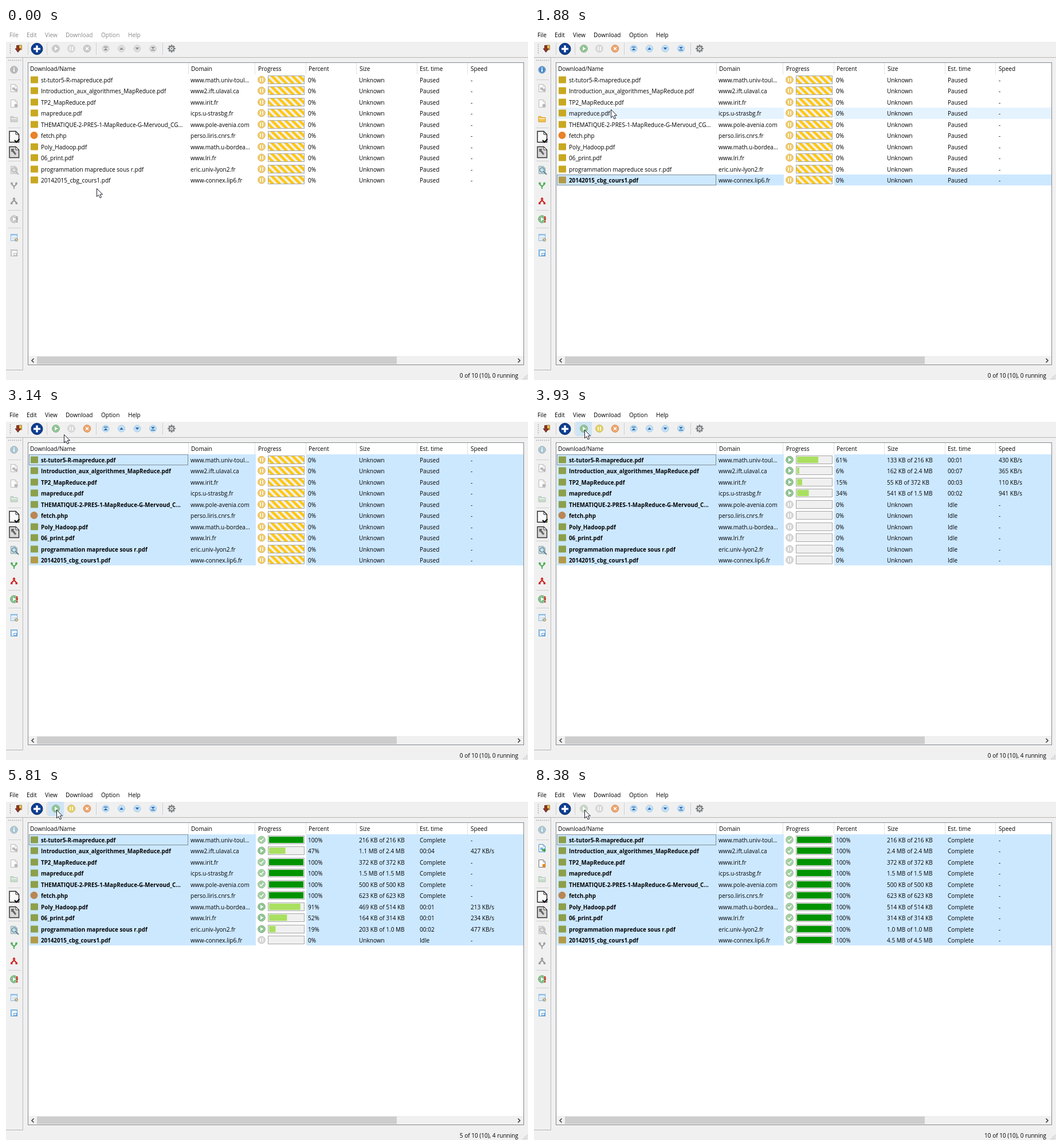
Write an HTML page that moves like this. It is 911 px wide and 615 px high and loops after 9.38 s.

```html
<!DOCTYPE html>
<html lang="en">
<head>
<meta charset="utf-8">
<title>Download list</title>
<style>
html, body { margin: 0; width: 100%; height: 100%; overflow: hidden; background: #f0f0f0; }
svg { display: block; }
text { font: 10.05px "Open Sans", "Noto Sans", sans-serif; white-space: pre; }
text.b { font-weight: 700; font-size: 9.8px; }
</style>
</head>
<body>
<svg id="stage" width="911" height="615" viewBox="0 0 911 615">
  <g id="base"></g>
  <g id="live"></g>
</svg>
<script>
const LOOP = 9380, SELECT = 1400, SELECT_ALL = 2550, START = 3500, ALL_DONE = 8380;
const GREY = '#b9b9b9', ROW_H = 19.45, TOP = 80.9;

// Bursts of repaints: first time, last time, number of steps
const bursts = [[0, 0, 1], [1000, 1000, 1], [1170, 1880, 10], [1960, 2030, 2], [2130, 3140, 11],
  [3220, 4070, 10], [4450, 4680, 3], [5000, 5950, 7], [6120, 7140, 9], [7370, 8010, 5], [8380, 8380, 1]];
const steps = bursts.flatMap(([a, b, n]) =>
  Array.from({ length: n }, (_, i) => n > 1 ? a + (b - a) * i / (n - 1) : a));

const pointer = [[0, 158, 280], [1000, 143, 273], [1170, 138, 268], [1400, 136, 264], [1560, 136, 262],
  [1880, 134, 142], [2030, 131, 110], [2130, 130, 100], [2400, 124, 87], [2700, 122, 86],
  [3140, 101, 46], [3220, 97, 43], [3409, 88, 38]];

// name, host, [time, KB] keys, speed at start and end
const rows = [
  ['st-tutor5-R-mapreduce.pdf', 'www.math.univ-toul...', [[3590, 0], [4060, 216]], 380, 460],
  ['Introduction_aux_algorithmes_MapReduce.pdf', 'www2.ift.ulaval.ca',
    [[3590, 0], [4680, 607], [7140, 1910], [8010, 2430], [8380, 2509]], 355.5, 511.3],
  ['TP2_MapReduce.pdf', 'www.irit.fr', [[3590, 0], [4680, 209], [5300, 372]], 100, 161],
  ['mapreduce.pdf', 'icps.u-strasbg.fr', [[3590, 0], [4440, 1580]], 900, 1020],
  ['THEMATIQUE-2-PRES-1-MapReduce-G-Mervoud_CG...', 'www.pole-avenia.com', [[4060, 0], [4600, 500]], 500, 700],
  ['fetch.php', 'perso.liris.cnrs.fr', [[4440, 0], [4680, 32], [5600, 623]], 90, 167],
  ['Poly_Hadoop.pdf', 'www.math.u-bordea...', [[4600, 0], [4680, 8], [5900, 514]], 20, 230],
  ['06_print.pdf', 'www.lri.fr', [[5300, 0], [6240, 314]], 150, 310],
  ['programmation mapreduce sous r.pdf', 'eric.univ-lyon2.fr', [[5600, 0], [6600, 1060]], 400, 800],
  ['20142015_cbg_cours1.pdf', 'www-connex.lip6.fr', [[5900, 0], [7100, 4650]], 900, 1010]
].map(([name, host, keys, v0, v1]) =>
  ({ name, host, keys, v0, v1, from: keys[0][0], to: keys.at(-1)[0], size: keys.at(-1)[1] }));

const lerp = (a, b, k) => a + (b - a) * k;
function along(keys, t, col = 1) {
  const i = keys.findIndex(k => k[0] > t);
  if (i < 0) return keys.at(-1)[col];
  if (!i) return keys[0][col];
  const a = keys[i - 1], b = keys[i];
  return lerp(a[col], b[col], (t - a[0]) / (b[0] - a[0]));
}

const rect = (x, y, w, h, fill, more = '') => `<rect x="${x}" y="${y}" width="${w}" height="${h}" fill="${fill}" ${more}/>`;
const box = (x, y, w, h, fill, line, more = '') => rect(x + .5, y + .5, w - 1, h - 1, fill, `stroke="${line}" ${more}`);
const path = (d, fill, more = '') => `<path d="${d}" fill="${fill}" ${more}/>`;
const stroke = (d, color, w = 1, more = '') => path(d, 'none', `stroke="${color}" stroke-width="${w}" ${more}`);
const disc = (r, fill, more = '') => `<circle r="${r}" fill="${fill}" ${more}/>`;
const text = (x, y, s, more = '') => `<text x="${x}" y="${y}" ${more}>${s}</text>`;
const at = (x, y, s) => `<g transform="translate(${x} ${y})">${s}</g>`;

const PLAY = path('M-2-3.6L3.6 0-2 3.6z', '#fff');
const PAUSE = rect(-2.7, -3.2, 1.7, 6.4, '#fff') + rect(1, -3.2, 1.7, 6.4, '#fff');
const CROSS = stroke('M-2.4-2.4L2.4 2.4M2.4-2.4L-2.4 2.4', '#fff', 1.8);
const CHECK = stroke('M-3 0L-.7 2.5 3.2-2.2', '#fff', 1.8);
const button = (mark, color, edge, r = 6.3) =>
  disc(r, color, `stroke="${edge}" stroke-width="1"`) + disc(r - 1.2, 'none', 'stroke="#fff" stroke-opacity=".45" stroke-width=".8"') + mark;

const sheet = (line, fill = '#fafafa') => path('M-5.5-6.5h7.5l3.5 3.5v9.5h-11z', fill, `stroke="${line}"`) +
  stroke('M2-6.5v3.5h3.5', line, .8);
const gear = (r, c) => stroke(`M0-${r}V${r}M-${r} 0H${r}M-${r * .7}-${r * .7}L${r * .7} ${r * .7}M${r * .7}-${r * .7}L-${r * .7} ${r * .7}`, c, r * .4) +
  disc(r * .72, c) + disc(r * .42, '#f0f0f0') + disc(r * .18, c);

function arrowIcon(kind, on) {
  const flip = kind > 1 ? -1 : 1, bar = kind % 3 === 0;
  const ink = on ? '#2f6fb5' : '#8f8f8f';
  return disc(6, on ? '#c5e0f5' : '#dedede', `stroke="${on ? '#a3cbe9' : '#cdcdcd'}"`) +
    `<g transform="scale(1 ${flip})">` + path(bar ? 'M0-1L3.4 3h-6.8z' : 'M0-2.2L3.4 2h-6.8z', ink) +
    (bar ? rect(-3.4, -3.4, 6.8, 1.5, ink) : '') + '</g>';
}

function staticPart() {
  let s = rect(0, 0, 911, 615, '#f0f0f0') + rect(0, 0, 911, 24, '#fff');
  s += stroke('M0 51.5H911', '#b4b4b4') + stroke('M29.5 52V597.5H0', '#b4b4b4') + stroke('M30.5 52V597', '#fafafa');
  s += stroke('M7.5 28V46', '#a0a0a0', 1.5, 'stroke-dasharray="1.5 2"') + stroke('M4 56.5H27', '#a0a0a0', 1.5, 'stroke-dasharray="1.5 2"');
  for (const x of [38, 71, 157, 273]) s += stroke(`M${x}.5 26V47`, '#cfcfcf');
  for (const y of [90, 174, 232, 318, 349]) s += stroke(`M4 ${y}.5H26`, '#cfcfcf');
  // Top bar: import, add, settings
  s += at(22, 36, path('M0-6h5.5V2H0z', '#f2c14e', 'stroke="#8d6a2a" stroke-width=".8"') +
    path('M-3.5-5.5h4V0h3.5L-1.2 6.5-6 0h2.5z', '#8f3524', 'stroke="#54231a" stroke-width=".8"'));
  s += at(54, 36.5, disc(10, '#0b3d91', 'stroke="#082c6c"') + path('M-1.7-6h3.4v4.3H6v3.4H1.7V6h-3.4V1.7H-6v-3.4h4.3z', '#fff'));
  s += at(289, 36, gear(6.8, '#7b7f82'));
  // Side bar: always enabled tools
  s += at(14, 190, path('M-8-9.5H3L8.5-4V9.5H-8z', '#fafafa', 'stroke="#222" stroke-width="1.4"') + stroke('M3-9.5V-4h5.5', '#222') +
    stroke('M1 6l3 3.5L9.5 4', '#000', 2));
  s += at(14, 217, path('M-8-9.5H3L8.5-4V9.5H-8z', '#d8d8d8', 'stroke="#333" stroke-width="1.4"') + path('M3-9.5V-4h5.5z', '#fff', 'stroke="#333"') +
    path('M-5-6H1L-1-4 4 3 2 5-3.5-1.5-5 0z', '#666'));
  s += at(14, 366, box(-6, -6, 12, 12, '#fff', '#74aedd') + rect(-5, -5, 10, 2, '#a9d0ee') + stroke('M-4-.5H4M-4 2.5H2', '#9cc5e6') + at(4, 4, gear(3.2, '#a99a6c')));
  // Table
  s += box(38, 60, 866, 529, '#fff', '#828790');
  for (const x of [319, 435, 524, 612, 718, 806]) s += stroke(`M${x - .5} 61V81`, '#e0e0e0');
  [[42, 'Download/Name'], [323, 'Domain'], [440, 'Progress'], [528, 'Percent'], [617, 'Size'], [722, 'Est. time'], [811, 'Speed']]
    .forEach(([x, label]) => s += text(x, 74.5, label));
  s += rect(39, 573, 864, 15, '#f0f0f0') + rect(54, 574, 628, 13, '#cdcdcd');
  s += stroke('M48.5 577.5L45 581l3.5 3.5M893.5 577.5L897 581l-3.5 3.5', '#404040', 1.6);
  for (let i = 0; i < 3; i++) for (let j = 0; j <= i; j++) s += rect(908 - 3 * j, 606 + 3 * i, 1.7, 1.7, '#bcbcbc');
  return s;
}

function tools(t, running, hot) {
  const on = t >= SELECT, many = t >= SELECT_ALL, done = t >= ALL_DONE;
  const canPlay = on && t < 5900, act = on && !done;
  const tone = (ok, c) => ok ? c : GREY;
  let s = '';
  [[6, 'File'], [36, 'Edit'], [68, 'View'], [104, 'Download'], [166, 'Option'], [213, 'Help']]
    .forEach(([x, label]) => s += text(x, 16, label, `fill="${on ? '#000' : '#8a8a8a'}"`));
  if (hot && canPlay) s += rect(73, 24, 28, 25, '#cfe4f4');
  s += at(87, 36, canPlay ? button(PLAY, '#84be87', '#6ba571') : on ? button(PLAY, '#c0d0c0', '#b3c4b3') : button(PLAY, '#c4c4c4', '#b6b6b6'));
  s += at(114, 36, running ? button(PAUSE, '#e2cd4e', '#c4ad3c') : button(PAUSE, '#d5d5d5', '#c8c8c8'));
  s += at(141.5, 36, on ? button(CROSS, '#eb9a5b', '#d5803f') : button(CROSS, '#c4c4c4', '#b6b6b6'));
  [174, 201.5, 229, 256.5].forEach((x, i) => s += at(x, 36, arrowIcon(i, on)));

  const info = !on ? GREY : many ? '#a9c7d3' : '#4b8fd0';
  s += at(14, 73, disc(6.3, info, 'stroke="#a9b4bc"') + rect(-1, -1.2, 2, 4.6, '#fff') + rect(-1, -4, 2, 1.8, '#fff'));
  s += at(14, 105, sheet(tone(done, '#4c8fc9')) + rect(-3, -1, 5, 4, tone(done, '#76b5e8')) + path('M0 2h3V0l4 3.5L3 7V5H0z', tone(done, '#3da044')));
  s += at(14, 132, sheet(tone(done, '#777')) + at(3.5, 3.5, disc(3, tone(done, '#e68a2e'))));
  const folder = !on ? '#cfcfcf' : many ? '#c5dccb' : '#f3c44f';
  s += at(14, 159, path('M-6-4.5h4.5l1.5 2h6v7.5H-6z', folder, `stroke="${on && !many ? '#d19a2c' : '#bcc4bc'}"`) + stroke('M-5-.5H5', '#fff', 1));
  s += at(14, 248, sheet(tone(act, '#8aa3af'), act ? '#cfe0e6' : '#e6e6e6') + disc(3.8, act ? '#bfe0ea' : '#ddd', `stroke="${act ? '#61818d' : '#aaa'}" stroke-width="1.3"`) +
    stroke('M3 3L8 8', tone(act, '#61818d'), 2));
  const fork = act ? '#4fae59' : '#a0a0a0', merge = act ? '#cf2222' : '#999';
  s += at(14, 275, stroke('M0 6V2L-4-2V-3M0 2L4-2V-3', fork, 2) + at(-4, -3.5, disc(2, fork)) + at(4, -3.5, disc(2, fork)));
  s += at(14, 302, stroke('M-4 5V3L0-1 4 3V5M0-1V-4', merge, 2.2) + path('M0-6.5L3-2.5h-6z', merge) +
    rect(-6, 3, 3.4, 3, merge) + rect(2.6, 3, 3.4, 3, merge));
  const alert = on ? '#d6302a' : '#a8a8a8';
  s += at(14, 334, button(PLAY, on ? '#79b77d' : '#c4c4c4', on ? '#5e9f66' : '#b6b6b6') + rect(4, -5, 2.4, 7, alert) + rect(4, 3.5, 2.4, 2.4, alert));
  const pane = tone(on, '#5f9fd6'), tint = on ? '#b5d6ef' : '#dadada';
  s += at(14, 393, box(-6, -6, 12, 12, '#fff', pane) + rect(-5, -5, 10, 2, tint) + rect(-5, -3, 2, 8, tint) + box(-1, 0, 6, 5, '#e8f2fa', pane));
  return s;
}

const amount = kb => kb < 1024 ? Math.floor(kb + 1e-6) + ' KB' : (Math.floor(kb / 102.4) / 10).toFixed(1) + ' MB';

function cells(row, t) {
  const kb = along(row.keys, t), part = kb / row.size;
  if (t >= row.to) return { state: 'done', part: 1, texts: ['100%', `${amount(row.size)} of ${amount(row.size)}`, 'Complete', '-'] };
  if (t >= row.from && kb > 0) {
    const speed = Math.round(lerp(row.v0, row.v1, (t - row.from) / (row.to - row.from)));
    const left = String(Math.ceil((row.size - kb) / speed)).padStart(2, '0');
    return { state: 'run', part, texts: [Math.floor(part * 100 + 1e-6) + '%', `${amount(kb)} of ${amount(row.size)}`, '00:' + left, speed + ' KB/s'] };
  }
  const state = t < START ? 'paused' : 'idle';
  return { state, part: 0, texts: ['0%', 'Unknown', t < START ? 'Paused' : 'Idle', '-'] };
}

const badges = {
  paused: button(PAUSE, '#eec65c', '#d9ad45'), idle: button(PAUSE, '#d2d2d2', '#bdbdbd'),
  run: button(PLAY, '#86bd88', '#6ba571'), done: button(CHECK, '#9ccb9c', '#82b286')
};

function bar(y, { state, part }) {
  let s = box(457, y - 8, 64, 15, '#f0f0f0', '#a6a6a6');
  if (state === 'paused') {
    let d = '';
    for (let x = -9; x < 64; x += 12) d += `M${x} 0h6.5l13 13h-6.5z`;
    s += `<svg x="458" y="${y - 7}" width="62" height="13">${path(d, '#ffc814')}</svg>`;
  } else if (part) {
    s += rect(459, y - 6, 60 * part, 11, part === 1 ? '#009300' : '#a9e060');
  }
  return s;
}

function rowPart(row, i, t, hover) {
  const y0 = Math.round(TOP + i * ROW_H), y = y0 + 10, h = Math.round(TOP + (i + 1) * ROW_H) - y0;
  const last = i === rows.length - 1;
  const picked = t >= SELECT_ALL || (last && t >= SELECT);
  const info = cells(row, t), fill = picked ? '#cce8ff' : hover === i ? '#e5f3ff' : '';
  let s = fill ? rect(40, y0, 396, h, fill) + rect(524, y0, 379, h, fill) : '';
  if (t >= SELECT_ALL ? i === 0 : t >= SELECT && last) {
    s += box(40, y0, 278, h, 'none', '#333', 'stroke-dasharray="1 1"');
  }
  s += row.name.endsWith('php')
    ? at(49, y - .5, disc(6.5, picked ? '#b98653' : '#e8822b'))
    : rect(43, y - 6.5, 13, 12, picked ? (last ? '#b39a48' : '#8d9f4a') : '#c9a820', 'rx="1"');
  const name = picked ? row.name.replace('_CG...', '_C...') : row.name;
  s += text(61, y + 3.7, name, picked ? 'class="b"' : '') + text(322, y + 3.7, row.host);
  s += at(446, y - .5, badges[info.state]) + bar(y, info);
  [527, 616, 722, 811].forEach((x, k) => s += text(x, y + 3.7, info.texts[k]));
  return s;
}

function draw(t) {
  const x = along(pointer, t), y = along(pointer, t, 2);
  const done = rows.filter(r => t >= r.to).length;
  const running = rows.filter(r => t >= r.from && t < r.to).length;
  const hover = x > 39 ? Math.floor((y - TOP) / ROW_H) : -1;
  let s = tools(t, running, x < 100 && y < 49);
  rows.forEach((row, i) => s += rowPart(row, i, t, hover));
  s += text(894, 610.5, `${done} of 10 (10), ${running} running`, 'text-anchor="end"');
  s += at(x + .5, y + .5, path('M0 0V14.2L3.2 11.2 5.6 16.4 8 15.3 5.7 10.3H10z', '#fff', 'stroke="#1c1c2e" stroke-width="1"'));
  document.getElementById('live').innerHTML = s;
}

document.getElementById('base').innerHTML = staticPart();
const began = performance.now();
let shown = -1;
function tick() {
  const t = Math.max(0, performance.now() - began) % LOOP;
  const step = steps.findLast(v => v <= t + .01);
  if (step !== shown) draw(shown = step);
  requestAnimationFrame(tick);
}
tick();
</script>
</body>
</html>
```
